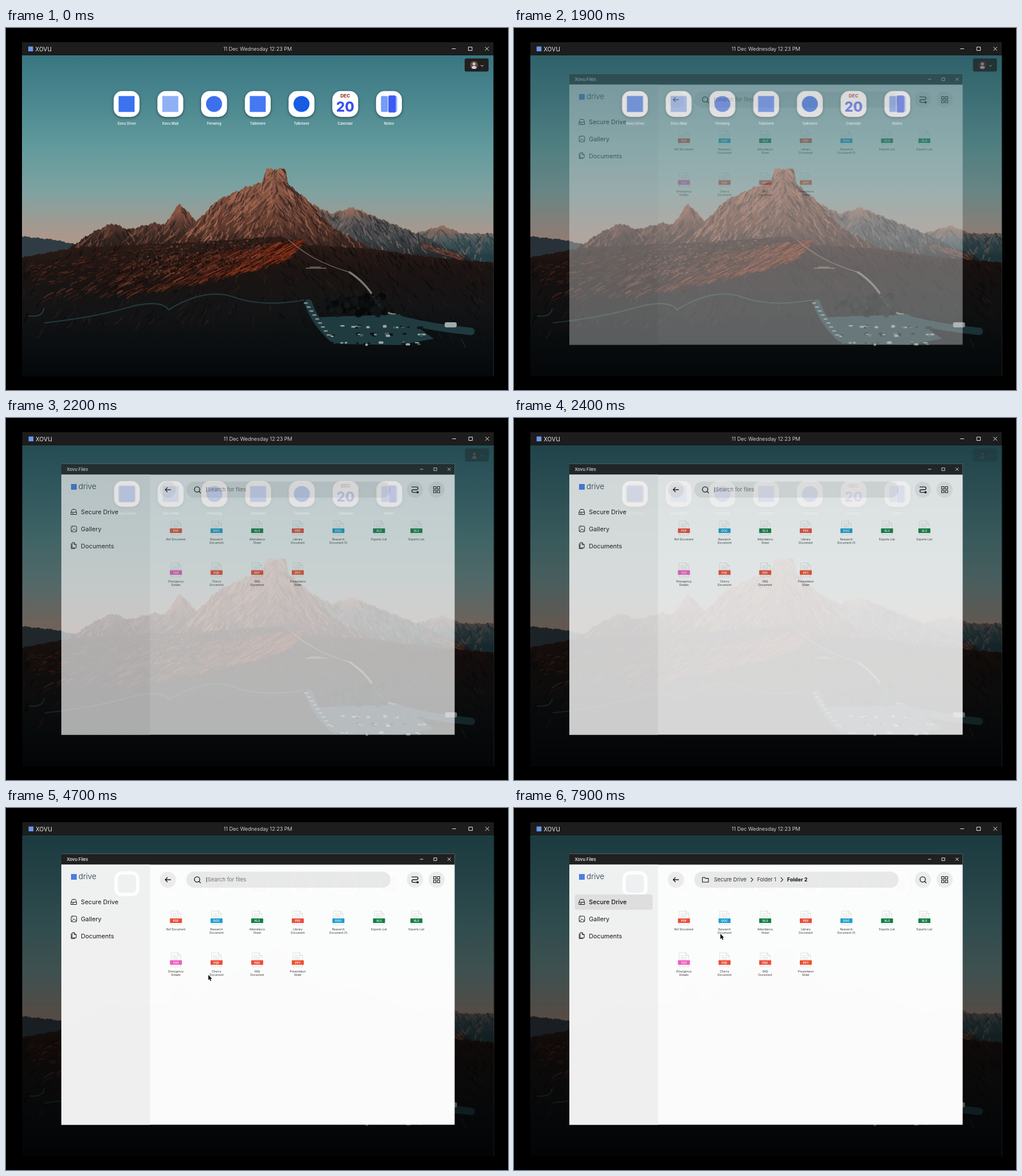
Write an HTML page with a canvas that moves like this. It is 880 by 636 pixels and loops after 8 s.

```html
<!DOCTYPE html>
<html lang="en">
<head>
<meta charset="utf-8">
<title>Desktop file browser</title>
<style>
html, body { margin: 0; width: 100%; height: 100%; overflow: hidden; background: #000; }
canvas { display: block; }
</style>
</head>
<body>
<canvas id="stage" width="880" height="636"></canvas>
<script>
const LOOP = 8000;
const stage = document.getElementById('stage').getContext('2d');
const newLayer = () => Object.assign(document.createElement('canvas'), { width: 880, height: 636 }).getContext('2d');
const desktop = newLayer(), explorer = newLayer();

// ---- helpers ----
const clamp = v => Math.min(1, Math.max(0, v));
const mix = (a, b, k) => a + (b - a) * k;
const easeOut = v => 1 - (1 - clamp(v)) ** 3;

let seed = 7;
const random = (low = 0, high = 1) => mix(low, high, (seed = seed * 16807 % 2147483647) / 2147483647);

function text(c, str, x, y, size, color, { weight = 400, align = 'left' } = {}) {
  c.font = `${weight} ${size}px Inter, sans-serif`;
  c.textAlign = align;
  c.fillStyle = color;
  c.fillText(str, x, y);
}
function box(c, x, y, w, h, r, fill) {
  c.beginPath();
  c.roundRect(x, y, w, h, r);
  c.fillStyle = fill;
  c.fill();
}
function disc(c, x, y, r, fill) {
  c.beginPath();
  c.arc(x, y, r, 0, 7);
  c.fillStyle = fill;
  c.fill();
}
function line(c, d, color, width = 1) {
  c.strokeStyle = color;
  c.lineWidth = width;
  c.lineCap = c.lineJoin = 'round';
  c.stroke(new Path2D(d));
}
function vertical(c, y0, y1, ...colors) {
  const g = c.createLinearGradient(0, y0, 0, y1);
  colors.forEach((color, i) => g.addColorStop(i / (colors.length - 1), color));
  return g;
}
function windowButtons(c, x, y, gap, r, color) {
  line(c, `M${x - r} ${y}h${2 * r}`, color, .9);
  line(c, `M${x + gap - r} ${y - r}h${2 * r}v${2 * r}h${-2 * r}z`, color, .9);
  line(c, `M${x + 2 * gap - r} ${y - r}l${2 * r} ${2 * r}m0 ${-2 * r}l${-2 * r} ${2 * r}`, color, .9);
}

// ---- wallpaper ----
// A jagged range through a few summits; slopes facing left catch the light.
function ridge(c, summits, fill, { rough = 1.2, grain = 0, lit, shade, depth = 70 } = {}) {
  const [left] = summits[0], [right] = summits.at(-1);
  const skyline = x => {
    const i = Math.max(1, summits.findIndex(([sx]) => sx >= x));
    const [x0, y0] = summits[i - 1], [x1, y1] = summits[i];
    const jag = Math.sin(x * .31) + .7 * Math.sin(x * .83 + 2) + .5 * Math.sin(x * 1.7);
    return mix(y0, y1, clamp((x - x0) / (x1 - x0))) + rough * jag;
  };
  const path = new Path2D(`M${left} 612`);
  for (let x = left; x < right; x++) path.lineTo(x, skyline(x));
  path.lineTo(right, skyline(right));
  path.lineTo(right, 612);
  c.fillStyle = fill;
  c.fill(path);
  c.save();
  c.clip(path);
  for (let n = 0; n < grain; n++) {
    const x = random(left + 1, right - 1), y = skyline(x) + depth * random() ** 1.3;
    const sunny = skyline(Math.min(right, x + 12)) < skyline(Math.max(left, x - 12));
    const bright = random() < (sunny ? .55 : .16);
    const lean = sunny ? -1 : 1, size = random(4, 15);
    line(c, `M${x} ${y}l${lean * size * random(0, .5)} ${size * .5}l${lean * size * random(0, .9)} ${size * .6}`,
      `rgba(${bright ? lit : shade},${random(.25, .7)})`, random(.7, 2.6));
  }
  c.restore();
}

// Grassy flank: streaks running down and left from a crest, brighter towards its top.
function drawSunlitSlope(c) {
  for (let n = 0; n < 1500; n++) {
    const u = Math.sqrt(random()), v = random();
    const top = mix(418, 370, u), bottom = mix(474, 402, u ** 2.2);
    const x = mix(155, 528, u) - 100 * (1 - u * .75) * v, y = mix(top, bottom, v);
    const size = random(6, 20), glow = u * 15 + v * 4 + random(-10, 12);
    const light = random() < .38 ? random(5, 12) : 15 + glow;
    line(c, `M${x} ${y}q${-size * .6} ${size * .2} ${-size} ${size * .55}`,
      `hsla(13,${mix(45, 66, u)}%,${light}%,.6)`, random(.7, 2.4));
  }
  // Boulder field across the upper flank.
  for (let n = 0; n < 750; n++) {
    const u = random(), x = mix(215, 455, u), y = mix(418, 383, u) + random(-24, 27);
    disc(c, x, y, random(.5, 1.9), `hsla(15,32%,${random(4, 38)}%,.7)`);
  }
}

function drawValley(c) {
  const teal = '#1f3b40';
  line(c, 'M40 506Q65 508 66 493M68 518Q150 509 210 492T285 495Q350 455 400 473T522 478', '#22393d', 2.2);
  line(c, 'M495 372Q515 390 540 404T602 429', '#78695f', 1.4);
  line(c, 'M602 429Q630 447 646 475T682 503', '#7d7a74', 3.4);
  line(c, 'M530 483Q540 515 572 545M690 512Q750 527 815 533', teal, 13);
  c.fillStyle = teal;
  c.fill(new Path2D('M550 508L690 503 750 546 690 557 575 555z'));
  for (let n = 0; n < 150; n++)
    disc(c, random(565, 665), random(474, 506) - 6 * random(), random(2, 7),
      `hsla(190,12%,${random(2, 10)}%,.8)`);
  for (let n = 0; n < 45; n++) {
    const row = n % 3, x = random(565, 735);
    box(c, x, 520 + row * 15 + random(0, 5), random(4, 9), random(2, 5), 1.5, ['#9da5a5', '#0c1416', '#49585a'][n % 5 % 3]);
  }
  for (let n = 0; n < 9; n++) box(c, 522 + n * 5, 482 + n * 7, 7, 2.5, 1, '#879191');
  box(c, 769, 517, 21, 9, 3, '#a4abaa');
  line(c, 'M526 422h35m-28-2h18', '#5c5550', 2);
}

function drawWallpaper(c) {
  c.save();
  c.beginPath();
  c.rect(28, 48, 826.5, 564);
  c.clip();
  c.fillStyle = vertical(c, 48, 368, '#387681', '#4b878f', '#619a9d', '#7fa2a1', '#ad978b');
  c.fillRect(28, 48, 827, 564);

  ridge(c, [[28, 366], [85, 372], [130, 382]], '#303c43', { rough: .7 });
  ridge(c, [[700, 366], [765, 347], [800, 361], [855, 361]], vertical(c, 345, 400, '#a0725f', '#4d5a5d', '#233e45'),
    { rough: .9, grain: 200, lit: '150,110,95', shade: '36,62,70', depth: 55 });
  ridge(c, [[525, 303], [570, 326], [608, 315], [650, 333], [730, 365], [815, 405]],
    vertical(c, 312, 400, '#a4725d', '#5d5757', '#45494b', '#25292b'),
    { grain: 600, lit: '150,125,115', shade: '38,43,47', depth: 75 });
  ridge(c, [[110, 387], [150, 360], [186, 343], [215, 354], [262, 342], [278, 346], [304, 308], [338, 343], [350, 390]],
    vertical(c, 308, 392, '#985f4a', '#68433a', '#392822', '#211a18'),
    { grain: 500, lit: '148,91,69', shade: '36,27,26' });
  ridge(c, [[290, 386], [370, 303], [420, 280], [449, 271], [456, 248], [490, 247], [495, 275], [530, 303], [575, 352], [650, 392]],
    vertical(c, 246, 390, '#97644f', '#835341', '#633c2f', '#35231e'),
    { grain: 1500, lit: '173,113,88', shade: '43,31,31', depth: 125 });
  ridge(c, [[28, 403], [120, 386], [300, 378], [480, 366], [530, 381], [640, 388], [740, 402], [855, 412]],
    vertical(c, 366, 612, '#301d18', '#1b1412', '#141415', '#0b0f11', '#05080a'),
    { rough: .7, grain: 700, lit: '48,34,29', shade: '8,9,11', depth: 140 });

  // Scattered evening light on the left shoulder and the distant right spur.
  for (let n = 0; n < 260; n++) {
    const x = random(45, 330), y = 442 - (x - 45) * .19 + random(-24, 14);
    line(c, `M${x} ${y}l${-random(2, 9)} 2`, `hsla(14,55%,${random(12, 32)}%,.6)`, random(.6, 1.7));
  }
  for (let n = 0; n < 90; n++) {
    const u = random();
    line(c, `M${mix(728, 800, u)} ${mix(382, 404, u) + random(-5, 4)}l5 2`, `hsla(15,42%,${random(20, 42)}%,.7)`, 1.3);
  }
  drawSunlitSlope(c);
  drawValley(c);
  c.restore();
}

// ---- desktop ----
function drawAvatar(c) {
  box(c, 804, 53.5, 42, 23, 3, '#201f20');
  disc(c, 820.5, 65, 7, '#68483f');
  c.save();
  c.clip();
  disc(c, 820.5, 63, 2.6, '#cfc4c4');
  disc(c, 820.5, 71, 4.6, '#cbd1e8');
  c.restore();
  line(c, 'M832.6 65.5l2 2 2-2', '#fff');
}

const apps = [
  { name: 'Xovu Drive', color: '#3a72f0' },
  { name: 'Xovu Mail', color: '#8fb0f5' },
  { name: 'Fenwing', color: '#3d70ee', round: true },
  { name: 'Talkmere', color: '#4579f3' },
  { name: 'Talkmere', color: '#175ce2', round: true },
  { name: 'Calendar', glyph: drawCalendar },
  { name: 'Notes', glyph: drawNotebook }
];
function drawCalendar(c, x) {
  text(c, 'DEC', x, 122.4, 8.2, '#8b2517', { weight: 700, align: 'center' });
  text(c, '20', x, 146.5, 24, '#3852ee', { weight: 800, align: 'center' });
}
function drawNotebook(c, x) {
  box(c, x - 14, 119.5, 12, 28, 2, '#749cf8');
  box(c, x + 11, 120, 3.5, 27, 1.5, '#9db8fa');
  box(c, x - 1, 118.5, 13, 30, 2, '#3c5af3');
}
function drawApp(c, { name, color, round, glyph }, i) {
  const x = 211.4 + i * 76.65, y = 133.5;
  c.shadowColor = '#0007';
  c.shadowBlur = 5;
  c.shadowOffsetY = 1.5;
  box(c, x - 22.7, y - 22.7, 45.4, 45.4, 15, '#fff');
  c.shadowColor = 'transparent';
  if (glyph) glyph(c, x);
  else box(c, x - 14, y - 14, 28, 28, round ? 14 : 0, color);
  text(c, name, x, 169.6, 6.2, '#fff', { weight: 500, align: 'center' });
}
function drawTopBar(c) {
  box(c, 28, 25, 826.5, 22.8, 0, '#1d1d1d');
  box(c, 39, 32.5, 8.5, 8.5, 0, '#6b95ef');
  text(c, 'xovu', 51.3, 40.7, 13, '#fff', { weight: 300 });
  text(c, '11 Dec Wednesday 12:23 PM', 441, 40.1, 9.05, '#fff', { weight: 300, align: 'center' });
  windowButtons(c, 785, 36.5, 29, 3, '#fff');
}

// ---- file window ----
const INK = '#161616';
const tagColors = { PDF: '#ee4d38', DOC: '#1ba0d0', XLS: '#108043', TXT: '#ee5fc1', PPT: '#f0512f' };
const files = [
  'PDF:Ref Document', 'DOC:Research/Document', 'XLS:Attendance/Sheet', 'PDF:Library/Document',
  'DOC:Research/Document (1)', 'XLS:Experts List', 'XLS:Experts List',
  'TXT:Emergency/Details', 'PDF:Cherry/Document', 'PDF:FAQ/Document', 'PPT:Presentaion/Slider'
];
function drawFile(c, file, i) {
  const [type, label] = file.split(':'), rows = label.split('/');
  const column = i % 7, x = column === 6 ? 719.4 : 297.9 + column * 71.2, y = 181 + (i < 7 ? 0 : 73.6);
  line(c, `M${x - 8.5} ${y + 24}v-24h12l5 5v19z`, '#dedede', .8);
  line(c, `M${x + 3.5} ${y}v5h5`, '#cfcfcf', .8);
  line(c, `M${x - 5.5} ${y + 5}h6m-6 3h10m-10 2.8h10`, '#d5d8d9', .8);
  box(c, x - 10.5, y + 13, 21, 8, .6, tagColors[type]);
  text(c, type, x, y + 18.9, 5.2, '#fff', { weight: 600, align: 'center' });
  rows.forEach((row, n) => text(c, row, x, y + 34 + n * 6.4, 5, '#333', { align: 'center' }));
}
function searchIcon(c, x, y) {
  line(c, `M${x - 5} ${y}a4.7 4.7 0 1 0 9.4 0a4.7 4.7 0 1 0 -9.4 0m8 3.4l2.6 2.6`, INK, 1.3);
}
function drawSidebar(c, opened) {
  box(c, 97, 99.5, 155.5, 457, 0, '#f3f3f3');
  c.strokeStyle = '#fff';
  c.lineWidth = 6;
  c.beginPath();
  c.roundRect(193, 114, 38, 38, 10);
  c.stroke();
  box(c, 114, 116, 10, 10, 0, '#4d80e5');
  text(c, 'drive', 127, 125.4, 13.6, '#203742', { weight: 300 });
  if (opened) box(c, 106.5, 151.7, 136.5, 27, 4, '#e1e1e1');
  ['Secure Drive', 'Gallery', 'Documents'].forEach((name, i) =>
    text(c, name, 131.3, 169 + i * 29.8, 10.8, INK, { weight: opened && !i ? 500 : 400 }));
  line(c, 'M114.2 165.5h9.4v4h-9.4zM114.6 165v-1.5l1.7-3h5.2l1.7 3v1.5M116.5 167.6h2', INK);
  box(c, 114.2, 190, 9.6, 10, 2, 'transparent');
  c.stroke();
  line(c, 'M115 199l4.2-4.2 4.3 4M116.6 192.8h.3', INK);
  line(c, 'M116 222v-3h3.5l3.6 3.5v5.5h-7zM119.5 219v3.5h3.5M114.3 221v8.5h6.5', INK);
}
function drawToolbar(c, opened, deeper) {
  box(c, 316, 111.7, 358, 28.4, 14.2, '#ebebeb');
  for (const x of [283.7, 716.8, 754.8]) disc(c, x, 125.9, 14.2, '#eee');
  line(c, 'M288.5 126h-9.4m3.7-3.7l-3.7 3.7 3.7 3.7', INK, 1.3);
  for (let i = 0; i < 4; i++)
    line(c, `M${749.5 + i % 2 * 6.5} ${120.5 + (i >> 1) * 6.5}h4.3v4.3h-4.3z`, INK, 1.1);
  if (!opened) {
    searchIcon(c, 335.3, 125.5);
    line(c, 'M351.7 122v8', INK, .8);
    text(c, 'Search for files', 353.3, 129.3, 9.5, '#777');
    line(c, 'M711.5 121.2h8.3a2.4 2.4 0 0 1 0 4.8h-6a2.3 2.3 0 0 0 0 4.6h6', INK, 1.3);
    disc(c, 721.5, 130.5, 2, INK);
    return;
  }
  searchIcon(c, 716.8, 125.5);
  line(c, 'M330.3 122h3.8l1.5 1.6h5.2v6.6h-10.5z', INK, 1.1);
  text(c, 'Secure Drive', 350.6, 129.2, 9.35, '#333');
  c.globalAlpha = deeper;
  for (const x of [415.5, 468]) line(c, `M${x} 122.5l3.4 3.4-3.4 3.4`, '#333', 1.2);
  text(c, 'Folder 1', 426.3, 129.2, 9.2, '#333');
  text(c, 'Folder 2', 478.7, 129.2, 9.1, '#111', { weight: 700 });
  c.globalAlpha = 1;
}
function drawExplorer(c, t) {
  const opened = t >= 5400;
  c.clearRect(0, 0, 880, 636);
  box(c, 97, 80.5, 689.5, 476, 0, '#fff');
  box(c, 97, 80.5, 689.5, 19, 0, '#202020');
  text(c, 'Xovu Files', 106.5, 93, 7.6, '#fff', { weight: 500 });
  windowButtons(c, 728.6, 90, 24.1, 2.4, '#fff');
  drawSidebar(c, opened);
  drawToolbar(c, opened, clamp((t - 7100) / 500));
  files.forEach((file, i) => drawFile(c, file, i));
}

// ---- motion ----
const pointerMoves = [
  { from: 4400, to: 5100, x: 153, y: 168 },
  { from: 5600, to: 5800, x: 233, y: 170 },
  { from: 5900, to: 7000, x: 335, y: 128.5 },
  { from: 7200, to: 7600, x: 334.5, y: 182 },
  { from: 7700, to: 7900, x: 361.8, y: 221 }
];
function drawPointer(c, t) {
  if (t < pointerMoves[0].from) return;
  let x = 506, y = 387;
  for (const move of pointerMoves) {
    const k = clamp((t - move.from) / (move.to - move.from));
    x = mix(x, move.x, k);
    y = mix(y, move.y, k);
  }
  const arrow = 'M0 0V9.2L2.2 7.3 3.8 10.8 5.2 10.1 3.7 6.8H6.3z';
  c.save();
  c.translate(x, y);
  line(c, arrow, '#fff');
  c.fillStyle = '#000';
  c.fill(new Path2D(arrow));
  c.restore();
}

function draw(t) {
  const c = stage, fade = easeOut((t - 1700) / 1500);
  c.fillStyle = '#000';
  c.fillRect(0, 0, 880, 636);
  c.save();
  if (fade) c.translate(.6, 0);
  c.drawImage(desktop.canvas, 0, 0);
  c.globalAlpha = 1 - fade;
  drawAvatar(c);
  c.globalAlpha = 1;
  box(c, 28, 48, 826.5, 564, 0, `rgba(0,0,0,${.5 * fade})`);
  drawTopBar(c);
  c.restore();
  if (fade) {
    drawExplorer(explorer, t);
    c.globalAlpha = fade * .985;
    c.drawImage(explorer.canvas, 0, 0);
    c.globalAlpha = 1;
  }
  drawPointer(c, t);
}

drawWallpaper(desktop);
apps.forEach((app, i) => drawApp(desktop, app, i));
const start = performance.now();
function tick() {
  // The screen refreshes ten times a second.
  draw(Math.floor((performance.now() - start) % LOOP / 100) * 100);
  requestAnimationFrame(tick);
}
tick();
</script>
</body>
</html>
```
